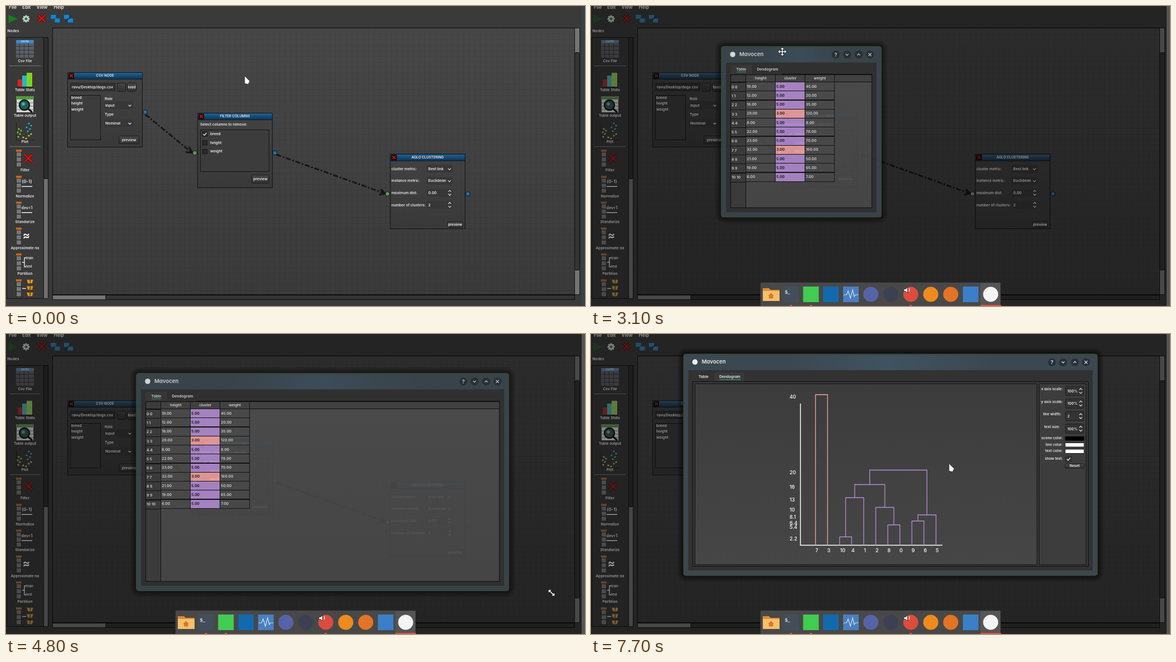
An HTML page that plays this animation: 1038 px wide and 539 px high, repeating every 8 s.

```html
<!DOCTYPE html>
<html lang="en">
<head>
<meta charset="utf-8">
<title>Node editor</title>
<style>
html, body { margin: 0; width: 100%; height: 100%; overflow: hidden; background: #3a3a3a; }
svg { display: block; width: 1038px; height: 539px; }
text { font-family: Inter, Lato, sans-serif; font-weight: 600; font-feature-settings: "cv11"; white-space: pre; }
</style>
</head>
<body>
<svg id="stage" viewBox="0 0 1038 539" xmlns="http://www.w3.org/2000/svg"></svg>
<script>
const LOOP = 8000, STEP = 100;
const INK = '#ececec', EDGE = '#151515', RED = '#d3120c';

// Drawing helpers; text is placed by its vertical centre.
const rect = (x, y, w, h, fill, more = '') =>
  `<rect x="${x}" y="${y}" width="${w}" height="${h}" fill="${fill}" ${more}/>`;
const box = (x, y, w, h, fill = 'none', line = EDGE, r = 0) =>
  rect(x + .5, y + .5, w - 1, h - 1, fill, `stroke="${line}" rx="${r}"`);
const path = (d, line, width = 1, fill = 'none', more = '') =>
  `<path d="${d}" stroke="${line}" stroke-width="${width}" fill="${fill}" ${more}/>`;
const dot = (x, y, r, fill, more = '') => `<circle cx="${x}" cy="${y}" r="${r}" fill="${fill}" ${more}/>`;
const text = (x, y, s, size = 6.7, anchor = 'start', fill = INK) =>
  `<text x="${x}" y="${y + size * .36}" font-size="${size}" text-anchor="${anchor}" fill="${fill}">${s}</text>`;
const mid = (x, y, s, size, fill) => text(x, y, s, size, 'middle', fill);
const range = n => [...Array(n).keys()];
const button = (x, y, w, h, label = '') =>
  box(x, y, w, h, 'url(#btn)', '#1c1c1c', 2) + mid(x + w / 2, y + h / 2, label);
const down = (x, y) => path(`M${x - 2.5} ${y - 1.2}l2.5 2.5 2.5-2.5`, INK, 1.1);
const up = (x, y) => path(`M${x - 2.5} ${y + 1.2}l2.5-2.5 2.5 2.5`, INK, 1.1);
const spin = (x, y) => up(x, y - 3.2) + down(x, y + 3.2);
const cross = (x, y, r, line, width) =>
  path(`M${x - r} ${y - r}l${2 * r} ${2 * r}m0 ${-2 * r}l${-2 * r} ${2 * r}`, line, width);
const redCross = (x, y, r, w) => cross(x, y, r, '#4c0805', w + 1.4) + cross(x, y, r, RED, w);
const tick = (x, y) => path(`M${x - 3} ${y}l2.3 2.3 4-4.6`, '#fff', 1.2);

const gradient = (id, stops, flat) =>
  `<linearGradient id="${id}" x2="${flat ? 1 : 0}" y2="${flat ? 0 : 1}">` +
  stops.map((c, i) => `<stop offset="${i / (stops.length - 1)}" stop-color="${c}"/>`).join('') + '</linearGradient>';

const defs = `<defs>
  ${gradient('canvas', ['#474747', '#414141', '#3a3a3a'])}
  ${gradient('btn', ['#454545', '#333'])}
  ${gradient('head', ['#236394', '#0d3454'])}
  ${gradient('body', ['#424242', '#393939'])}
  ${gradient('title', ['#3c4850', '#3c4850', '#3f5360', '#3c4850', '#3c4850'], true)}
  ${gradient('sheet', ['#505050', '#4b4b4b'])}
  ${gradient('plot', ['#3c3c3c', '#464646'])}
  <pattern id="grid" width="10" height="10" patternUnits="userSpaceOnUse">
    <path d="M0 .5H10M.5 0V10" stroke="#000" stroke-opacity=".06"/></pattern></defs>`;

// ---- main window ----
function toolbar() {
  const teeth = range(4).map(i => rect(34.7, 16.5, 2.6, 13, '#cfd8cf', `transform="rotate(${i * 45} 36 23)"`)).join('');
  const squares = x => rect(x, 15.5, 10, 8, '#1c83c6', 'stroke="#0e456b" stroke-width=".8"') +
    rect(x + 7, 22, 10, 8, '#1c83c6', 'stroke="#0e456b" stroke-width=".8"');
  const menu = [['File', 5], ['Edit', 29], ['View', 54.5], ['Help', 85.5]];
  return menu.map(([s, x]) => text(x, 1.5, s, 8.3)).join('') +
    '<path id="play" d="M4.5 15.5L20.5 23 4.5 30.5z"/>' +
    teeth + dot(36, 23, 4.8, '#cfd8cf') + dot(36, 23, 2.6, '#2e7d32') + redCross(64, 22.5, 6.3, 2.8) +
    squares(80) + squares(103.5) + path('M105 29l14-12', '#17364b', 1.4) + text(2.5, 44.5, 'Nodes');
}

function sidebar() {
  const column = y => rect(18, y, 10, 4, '#c9651b') +
    range(3).map(i => box(18, y + 4 + i * 9, 10, 9.5, '#777', '#2a2a2a')).join('');
  const labels = [['Csv File', 99], ['Table Stats', 150.5], ['Table output', 197], ['Plot', 244], ['Filter', 295],
    ['Normalize', 342], ['Standarize', 388], ['Approximate na', 435], ['Partition', 481]];
  const clusters = [
    ['#28b8c8', [[41, 211], [37, 218], [43, 221], [45, 215], [39, 225]]],
    ['#7ccf2b', [[23, 221], [27, 224], [21, 227], [25, 230], [22, 235]]],
    ['#d8c52b', [[31, 236], [36, 238], [41, 233], [45, 230]]]];
  const scatter = clusters.map(([c, points]) => points.map(([x, y]) => dot(x, y, 1.6, c)).join('')).join('');
  const buckets = range(3).map(i =>
    path(`M37 ${491.5 + i * 11.5}h12l-2 7h-8z`, '#6d4308', .8, '#dd9a2b') + mid(43, 495 + i * 11.5, i + 1, 6, '#111')).join('');
  return box(1, 56, 67, 470, '#393939') + box(67, 56, 9, 470, '#707070') + box(67, 56, 9, 255, '#2e2e2e', '#0d0d0d', 3) +
    path('M6 107.5h56M6 252.5h56', '#777') +
    rect(18, 61, 32, 32, '#5a5f66', 'rx="2"') + rect(18, 61, 32, 6, '#3f86c6', 'rx="2"') + mid(34, 64, 'csv file', 4) +
    path('M18 72.5h32m-32 7h32m-32 7h32M24.5 67v26m8-26v26m8-26v26', '#30343a') +
    rect(21, 132, 9, 13, '#d82222') + rect(29, 125, 9, 20, '#22b9c4') + rect(37, 120, 10, 25, '#7ed321') +
    path('M20 145.5h28', '#111') +
    box(18, 162, 32, 30, '#d5d8d2', '#333') + rect(18, 162, 32, 6, '#4f9a3d') + path('M18 174h32m-32 6h32m-32 6h32', '#777') +
    dot(33, 178, 9, '#1d5c58', 'stroke="#151515" stroke-width="2.5"') + path('M39 184l8 7', '#111', 3) +
    dot(31, 176, 3, '#54a99d') + path('M18.5 209v32h31', '#222') + scatter +
    [258, 305, 351.5, 398, 444.5, 491].map(column).join('') +
    redCross(40, 273.5, 7, 3) + mid(37.5, 315, '(0-1)', 8) + rect(28, 323.5, 19, 1.5, '#eee') +
    mid(37.5, 362, 'dev=1', 7) + rect(28, 370.5, 19, 1.5, '#eee') + mid(36.5, 412, '≈', 20, '#fff') +
    path('M36 452.5h-3v16h3m-7-8h4', '#eee', 1.3) + text(36, 453, 'train', 5.8) + text(36, 468, 'test', 5.8) +
    path('M29 507.5h7', '#eee', 1.3) + buckets + labels.map(([s, y]) => mid(34, y, s, 6.6)).join('');
}

const node = (x, y, title, body) => box(x, y, 135, 135, 'url(#body)', '#111') +
  box(x, y, 135, 13, 'url(#head)', '#0b1a28') + rect(x + 2, y + 1.5, 10, 10, '#140606') +
  redCross(x + 7, y + 6.3, 2.8, 1.5) + mid(x + 67.5, y + 6.2, title, 6.2) + body;

function graph() {
  const combo = (x, y, w, s) => rect(x, y - 7, w, 14, '#373737', 'rx="2"') + text(x + 3, y, s) + down(x + w - 6, y + .5);
  const csv = box(115, 138, 81, 15, '#313131', '#262626') + text(118, 145.5, 'ravu/Desktop/dogs.csv', 6.5) +
    button(199, 138, 16, 16) + button(217, 138, 17, 16, 'load') + box(115, 160, 55, 81, '#3c3c3c') +
    ['breed', 'height', 'weight'].map((s, i) => text(117, 164.5 + i * 10.3, s)).join('') +
    text(177, 167, 'Role') + combo(175, 178.3, 53, 'Input') + text(177, 194.3, 'Type') + combo(175, 210.7, 53, 'Nominal') +
    button(202, 233, 37, 15, 'preview');
  const filter = text(348, 213, 'Select columns to remove:', 6.6) + box(348, 222, 124, 76, '#3c3c3c') +
    ['breed', 'height', 'weight'].map((s, i) => box(352, 225.5 + i * 15.7, 9, 9, '#2a2a2a') + text(366, 229.5 + i * 15.7, s)).join('') +
    tick(356.5, 230) + button(440, 303, 32, 16, 'preview');
  const cluster = ['cluster metric:', 'instance metric:', 'maximum dist:', 'number of clusters:']
    .map((s, i) => text(691, 292.5 + i * 21.6, s, 6.5)).join('') +
    combo(754, 292.5, 47, 'Best link') + combo(754, 314, 47, 'Euclidean') +
    [['0.00', 335.7], ['2', 357.3]].map(([s, y]) => rect(754, y - 7, 47, 14, '#373737', 'rx="2"') + text(757, y, s) + spin(795.5, y)).join('') +
    button(791, 387, 28, 11, 'preview');
  const link = d => path(d, '#161616', 3, 'none', 'stroke-dasharray="9 3 3 3"');
  const port = (x, y, fill) => dot(x, y, 3.9, fill, 'stroke="#101010"');
  const blue = '#1d72b4', green = '#5c9760';
  return box(83, 39, 937, 480, 'url(#canvas)', '#0c0c0c') + rect(84, 40, 935, 478, 'url(#grid)') +
    box(1019, 39, 10, 480, '#747474') + box(1019, 83, 10, 392, '#343434', '#0d0d0d', 3) +
    box(83, 519, 937, 9, '#747474') + box(178, 519, 842, 9, '#343434', '#0d0d0d', 3) +
    node(110, 119, 'CSV NODE', csv) + node(343, 192, 'FILTER COLUMNS', filter) + node(688.5, 265.7, 'AGLO CLUSTERING', cluster) +
    link('M250 195L334 264') + path('M328 253l6 11-12-1.5', '#161616', 3) +
    link('M485 267L680 337') + path('M672 329l8 8-11 2', '#161616', 3) +
    port(249.5, 190.5, blue) + port(338.5, 264, green) + port(482, 264, blue) + port(684, 337.5, green) + port(828, 337.5, blue);
}

// ---- dock ----
function dock() {
  const x = i => 322.7 + i * 35.8;
  const square = (i, fill) => rect(x(i) - 14, 504, 28, 28, fill);
  const disc = (i, fill) => dot(x(i), 518, 13.5, fill);
  return box(303, 496, 432, 48, '#484848', '#2a2a2a', 3) + rect(698, 498, 36, 41, '#555') +
    path('M308 507h11l3 3h16v20h-30z', 'none', 0, '#e08a35') + rect(308, 512, 30, 18, '#f5c069') +
    path('M317.5 520.5l5.2-5 5.2 5h-1.5v5h-7.4v-5z', 'none', 0, '#d8762b') +
    square(1, '#434e5a') + text(347.5, 514, '$_', 8) +
    square(2, '#41cd52') + square(3, '#1269ad') + square(4, '#4a7fc0') +
    path('M453 519h5l3-7 4 13 4-15 3 12 2-3h5', '#cfe2f7', 1.2) +
    disc(5, '#5763a8') + disc(6, '#3b4152') + disc(7, '#dd4b3e') + disc(8, '#f08a1d') + disc(9, '#e27425') +
    square(10, '#3b7fc9') + disc(11, '#f4f4f4') +
    path('M561 508.5h3l3.5-3v10l-3.5-3h-3z', '#222', .8, '#fff') + path('M570 507q2 3 0 6', '#fff', 1.2) +
    [1, 2, 7].map(i => rect(x(i) - 2, 537, 4, 2, '#e0523f')).join('') + rect(698, 537, 37, 2, '#e0523f');
}

// ---- result dialog ----
function table(w, h) {
  const heights = [19, 12, 18, 29, 8, 22, 23, 32, 21, 19, 6];
  const weights = [45, 20, 35, 120, 8, 78, 70, 160, 50, 65, 7];
  const rowH = 16.25, right = w - 16;
  const rows = heights.map((v, i) => {
    const y = Math.floor(63.6 + i * rowH) + .5, c = 71.3 + i * rowH, odd = i === 3 || i === 7;
    return rect(16.5, y + 1, 27, 16, '#3f3f3f', 'stroke="#0c0c0c"') + text(18, c + 1.2, `${i} ${i}`) +
      [43.5, 96.5, 149.5].map((x, k) => rect(x, y, 53, 16, k === 1 ? (odd ? '#fda9a8' : '#bb92db') : '#4f4f4f', 'stroke="#111"')).join('') +
      text(45.3, c, v.toFixed(2)) + text(98.3, c, odd ? '3.00' : '5.00', 6.7, 'start', '#151515') + text(151.3, c, weights[i].toFixed(2));
  }).join('');
  return box(16, 50, w - 32, h - 66, 'url(#sheet)', '#0a0a0a') + rect(17, 51, w - 34, 13, '#454545') +
    rect(17, 51, 26, h - 68, '#3f3f3f') + path(`M17 63.5H${right}M43.5 51V${h - 17}M96.5 51v13m53-13v13m53-13v13`, '#0c0c0c') +
    ['height', 'cluster', 'weight'].map((s, i) => mid(70.3 + i * 53, 56.5, s)).join('') + rows;
}

function dendrogram() {
  const leaf = i => 402.5 + i * 21.6, base = 379.5;
  const pink = '#f7a3a3', violet = '#b78ad6';
  let lines = '';
  const join = (a, b, y, color = violet) => {
    lines += path(`M${a.x} ${a.y}V${y}H${b.x}V${b.y}`, color, 1.3);
    return { x: (a.x + b.x) / 2, y };
  };
  const L = range(11).map(i => ({ x: leaf(i), y: base }));
  join(L[0], L[1], 109, pink);
  const left = join(join(L[2], L[3], 364.5), L[4], 294);
  const middle = join(L[5], join(L[6], L[7], 343), 311.5);
  const last = join(join(L[8], L[9], 336), L[10], 325);
  join(join(left, middle, 270.5), last, 244.5);
  const scale = [['40', 113], ['20', 248.5], ['16', 274.5], ['13', 297.5], ['10', 315.5], ['8.1', 329], ['6.4', 340], ['5.4', 346.5], ['2.2', 368]];
  const fields = [['x axis scale:', '100%', 846], ['y axis scale:', '100%', 846], ['line width:', '2', 843], ['text size:', '100%', 841]];
  const swatches = [['scene color:', '#000'], ['line color:', '#fff'], ['text color:', '#fff']];
  return '<g transform="translate(-166.4 -36.4)">' + box(182, 85, 710, 333, '#373737', '#0c0c0c') +
    box(186, 89, 614, 326, 'url(#plot)', '#111') + box(803, 89, 85, 326, '#3d3d3d', '#111') +
    path('M375.5 125V379.5H630', '#fff', 1.5) + lines + scale.map(([s, y]) => text(356, y, s, 8.8)).join('') +
    [7, 3, 10, 4, 1, 2, 8, 0, 9, 6, 5].map((n, i) => mid(leaf(i) + (n > 9 ? 5.5 : 2.3), 388.5, n, 8.8)).join('') +
    fields.map(([s, v, x], i) => {
      const y = 102.3 + i * 22.6;
      return text(x, y - 3.6, s, 6.5, 'end') + box(850, y - 9, 34, 18, '#333', '#1f1f1f', 2) + text(854, y, v) + spin(878, y);
    }).join('') +
    swatches.map(([s, c], i) => text(846, 187 + i * 11.5, s, 6.5, 'end') + box(849.5, 183.5 + i * 11.5, 35, 8.5, c, '#1a1a1a', 1)).join('') +
    text(846, 223.5, 'show text:', 6.5, 'end') + rect(850, 219, 12, 11, '#303030') + tick(856, 224.7) +
    button(849.5, 232.5, 35, 9, 'Reset') + '</g>';
}

function dialog(w, h, plot) {
  const halo = [22, 16, 11, 7].map(n => rect(0, 0, w, h, 'none', `rx="5" stroke="#000" stroke-opacity=".16" stroke-width="${n}"`)).join('');
  const knob = (dx, glyph) => dot(w - dx, 14.3, 7.2, '#293137') + glyph(w - dx, 14.3);
  const tabX = plot ? 55 : 16, underline = plot ? [64, 38] : [27, 17];
  return halo + rect(0, 0, w, h, '#3c4850', 'rx="4" stroke="#3b4a39" stroke-width="2"') +
    rect(1.5, 1.5, w - 3, 27, 'url(#title)', 'rx="3"') + dot(20, 14, 4.8, '#f2f2f2') + text(32, 13.5, 'Mavocen', 9.6) +
    knob(81, (x, y) => mid(x, y, '?', 9)) + knob(61, down) + knob(40, up) + knob(20, (x, y) => cross(x, y, 2.6, INK, 1.2)) +
    rect(8, 28.5, w - 16, h - 37, '#323232') + rect(tabX, 33, plot ? 53 : 39, 16, '#3a3a3a') +
    path(`M108 49.5H${w - 16}`, '#0c0c0c') + mid(35.3, 40.3, 'Table') + mid(82.5, 40.3, 'Dendogram') +
    rect(underline[0], 45, underline[1], 1, '#3fa287') + (plot ? dendrogram() : table(w, h));
}

// ---- pointers ----
const pointers = {
  arrow: path('M0 0L9 9 6 14.5 0 13z', '#333', .6, '#fff'),
  move: ['#111', '#fff'].map((c, i) => path('M-6.5 0h13M0-6.5v13M-4.5-2l-2 2 2 2m9-4l2 2-2 2M-2-4.5l2-2 2 2m-4 9l2 2 2-2', c, i ? 1.5 : 3)).join(''),
  size: ['#111', '#fff'].map((c, i) => path('M-4-4L4 4M-4.5-1v-3.5h3.5M4.5 1v3.5h-3.5', c, i ? 1.7 : 3.2)).join('')
};

// ---- motion: [time, values...] ----
const pointerPath = [[400, 428, 126], [1000, 11, 20], [1100, 11, 20], [1300, 12, 25], [2000, 12, 25], [2500, 321, 92],
  [3000, 321, 92], [3100, 343, 82], [3200, 343, 80], [3300, 343, 80], [3800, 542, 432], [3900, 520, 374], [4000, 518, 372],
  [4300, 518, 372], [4400, 540, 380], [4700, 930, 455], [4800, 978, 465], [5000, 978, 471], [5300, 978, 471],
  [5500, 392, 78], [5800, 392, 78], [5900, 324, 45], [6000, 324, 45], [6200, 160, 50], [6300, 160, 50], [6400, 303, 253],
  [6500, 303, 253], [6700, 250, 78], [7200, 250, 78], [7400, 375, 157], [7500, 531, 262], [7600, 531, 262], [7700, 642, 233]];
const dialogPath = [[3000, 212, 81, 286, 306], [3100, 234, 73, 286, 306], [3200, 234, 71, 286, 306], [4300, 234, 71, 286, 306],
  [4400, 234, 71, 300, 311], [4600, 234, 71, 490, 355], [4800, 234, 71, 667, 390], [5000, 234, 71, 741, 397],
  [5800, 234, 71, 741, 397], [5900, 166.4, 36.4, 741, 397]];

function track(keys, t) {
  const i = keys.findIndex(k => k[0] > t);
  if (i === 0) return keys[0].slice(1);
  if (i < 0) return keys[keys.length - 1].slice(1);
  const a = keys[i - 1], b = keys[i], p = (t - a[0]) / (b[0] - a[0]);
  return a.slice(1).map((v, k) => v + (b[k + 1] - v) * p);
}
const within = (t, from, to) => t >= from && t < to;

const $ = id => document.getElementById(id);
$('stage').innerHTML = defs + `<g id="main">${rect(0, 0, 1038, 539, '#3a3a3a')}${toolbar()}${sidebar()}${graph()}</g>` +
  `<rect id="strip" x="1032" y="0" width="6" height="539"/><g id="dialog"></g><g id="dock">${dock()}</g><g id="pointer"></g>`;

let drawn = -1;
function render(now) {
  const t = Math.floor(now % LOOP / STEP) * STEP;
  if (t === drawn) return;
  drawn = t;
  const shown = Math.max(0, Math.min(1, (t - 2000) / 500));
  $('main').style.filter = shown ? `brightness(${1 - .38 * shown}) saturate(${1 - .42 * shown})` : 'none';
  $('strip').setAttribute('fill', shown > .5 ? '#565656' : '#36424a');
  $('play').setAttribute('fill', within(t, 1700, 1900) ? '#0a4a0e' : t >= 1000 ? '#0e6514' : '#11811a');
  $('dock').setAttribute('transform', `translate(0 ${46 * (1 - shown)})`);

  const [x, y, w, h] = track(dialogPath, t);
  const moving = within(t, 3100, 3400) || within(t, 5900, 6100);
  const sizing = within(t, 4400, 5400);
  $('dialog').innerHTML = shown ? dialog(Math.round(w), Math.round(h), t >= 6900) : '';
  $('dialog').setAttribute('transform', `translate(${x} ${y})`);
  $('dialog').setAttribute('opacity', moving || sizing ? .85 : shown);

  const [px, py] = track(pointerPath, t);
  $('pointer').innerHTML = pointers[moving ? 'move' : within(t, 4000, 5400) ? 'size' : 'arrow'];
  $('pointer').setAttribute('transform', `translate(${px} ${py})`);
}

const start = performance.now();
function loop() {
  render(performance.now() - start);
  requestAnimationFrame(loop);
}
loop();
</script>
</body>
</html>
```
